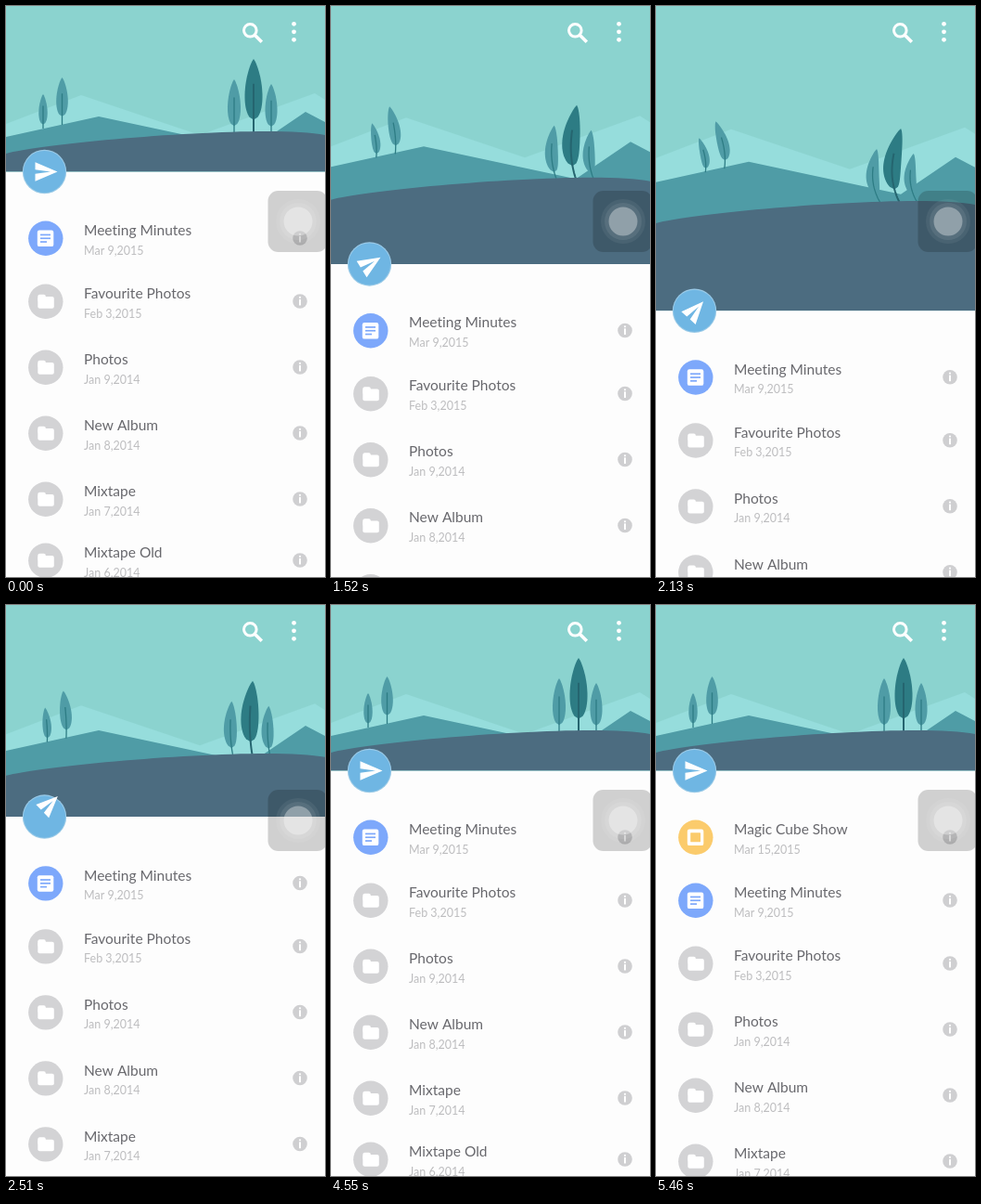
An HTML page with a canvas that plays this animation: 344x615 px, repeating every 5560 ms.

```html
<!DOCTYPE html>
<html lang="en">
<head>
<meta charset="utf-8">
<title>Pull to refresh</title>
<style>
html, body { margin: 0; width: 100%; height: 100%; overflow: hidden; background: #fdfdfd; }
canvas { display: block; width: 344px; height: 615px; }
</style>
</head>
<body>
<canvas id="stage"></canvas>
<script>
const W = 344, H = 615, LOOP = 5560, HEADER = 178.5;
const PULL = 760, RELEASE = 2470, FLY_BACK = 3132, LAND = 4070, INSERT = 4610, REVEAL = 4830;
const canvas = document.getElementById('stage');
const dpr = window.devicePixelRatio || 1;
canvas.width = W * dpr;
canvas.height = H * dpr;
const ctx = canvas.getContext('2d');

// title, date, icon kind, distance to the next row
const rows = [
  ['Meeting Minutes', 'Mar 9,2015', 'doc', 68],
  ['Favourite Photos', 'Feb 3,2015', 'folder', 71],
  ['Photos', 'Jan 9,2014', 'folder', 71],
  ['New Album', 'Jan 8,2014', 'folder', 71],
  ['Mixtape', 'Jan 7,2014', 'folder', 66],
  ['Mixtape Old', 'Jan 6,2014', 'folder', 71]
];
const newRow = ['Magic Cube Show', 'Mar 15,2015', 'slide', 68];
const iconColors = { doc: '#7da8fb', folder: '#d3d3d5', slide: '#fbcb6c' };

const progress = (t, start, length) => Math.min(1, Math.max(0, (t - start) / length));
const easeInOut = x => (1 - Math.cos(Math.PI * x)) / 2;
const easeOut = x => 1 - (1 - x) * (1 - x);
const mix = (a, b, x) => a + (b - a) * x;

function shape(color, build) {
  ctx.beginPath();
  build();
  ctx.fillStyle = color;
  ctx.fill();
}
const polygon = (color, points) =>
  shape(color, () => { points.forEach(p => ctx.lineTo(...p)); ctx.closePath(); });
const disc = (x, y, r, color) => shape(color, () => ctx.arc(x, y, r, 0, 7));
const box = (x, y, w, h, r, color) => shape(color, () => ctx.roundRect(x, y, w, h, r));

function place(x, y, draw, sx = 1, sy = sx, angle = 0) {
  ctx.save();
  ctx.translate(x, y);
  ctx.rotate(angle);
  ctx.scale(sx, sy);
  draw();
  ctx.restore();
}

function pullDistance(t) {
  if (t < PULL) return 0;
  const dragged = at => 250 * (1 - Math.exp((PULL - at) / 1500));
  if (t < RELEASE) return dragged(t);
  const x = progress(t, RELEASE, 500);
  return x < 1 ? dragged(RELEASE) * 2 ** (-10 * x) * Math.cos(4 * Math.PI * x) : 0;
}

// A leaf-shaped crown on a trunk; bow and lean are fractions of the height.
function tree(x, y, height, halfWidth, crownStart, bow, lean, crown, trunk) {
  const point = (u, side) => [
    x + height * (bow * Math.sin(Math.PI * u ** 0.85) + lean * u) + side,
    y - height * u
  ];
  const left = [], right = [], stem = [];
  for (let i = 0; i <= 24; i++) {
    const v = i / 24, u = mix(crownStart, 1, v);
    const w = halfWidth * Math.sqrt(v) * (1 - v) ** 0.8 / 0.42;
    left.push(point(u, -w));
    right.unshift(point(u, w));
    stem.push(point(v * 0.66, 0));
  }
  polygon(crown, left.concat(right));
  ctx.beginPath();
  stem.forEach(p => ctx.lineTo(...p));
  ctx.strokeStyle = trunk;
  ctx.lineWidth = height > 70 ? 2 : 1.3;
  ctx.stroke();
}

function scenery(d) {
  const k = d / 149, bottom = HEADER + d;
  ctx.save();
  ctx.beginPath();
  ctx.rect(0, 0, W, bottom);
  ctx.clip();
  ctx.fillStyle = '#8bd3cf';
  ctx.fillRect(0, 0, W, bottom);
  const ridge = (color, shift, points) =>
    polygon(color, [...points.map(([x, y]) => [x, y + shift]), [W, bottom], [0, bottom]]);
  ridge('#96dddc', d * 0.245, [[0, 127], [81, 96], [209, 139], [333, 94], [W, 101]]);
  ridge('#4f9ca6', d * 0.325, [[0, 141], [100, 119], [264, 154], [323, 114], [W, 125]]);
  const light = '#4f9ca6', deep = '#2d7c84', dark = '#25656f';
  [[40, 132, 37, 4.7, 0.12], [60.5, 128, 51, 6.3, 0.18]].forEach(([x, y, h, w, c]) =>
    tree(x + d * 0.088, y + d * 0.315, h, w, c, 0.07 * k, -0.18 * k, light, deep));
  [[246, 57, 7, 0.12, -0.06, light, deep], [286, 52, 6.5, 0.12, -0.07, light, deep],
   [267, 79, 9.5, 0.17, 0.02, deep, dark]].forEach(([x, h, w, c, lean, crown, trunk]) =>
    tree(x - d * 0.03, 136 + d * 0.5, h, w, c, -0.11 * k, lean * k, crown, trunk));
  shape('#4c6c80', () => {
    const y = d * 0.5;
    ctx.moveTo(0, 159 + y);
    ctx.bezierCurveTo(43, 147 + y, 281, 126.5 + y, W, 139 + y);
    ctx.lineTo(W, bottom);
    ctx.lineTo(0, bottom);
  });
  ctx.restore();
}

function icon(kind) {
  const color = iconColors[kind];
  disc(0, 0, 18.7, color);
  if (kind === 'folder') {
    box(-8.5, -7.5, 8.5, 8, 2, '#fff');
    box(-8.5, -5.2, 17.5, 12.7, 2, '#fff');
    return;
  }
  box(-9, -8.7, 17.5, 17.5, 2.2, '#fff');
  if (kind === 'slide') box(-5.6, -5, 10.8, 10, 0.5, color);
  else [11, 11, 7].forEach((w, i) => box(-5.8, -4.7 + i * 3.8, w, 1.7, 0, color));
}

function row([title, date, kind], y, shown = 1) {
  if (shown <= 0) return;
  place(42.8, y + 0.3, () => icon(kind), shown);
  place(84, y, () => {
    ctx.fillStyle = '#68686d';
    ctx.font = '15.5px Lato, sans-serif';
    ctx.fillText(title, 0, -3);
    ctx.fillStyle = '#bdbdbf';
    ctx.font = '12.5px Lato, sans-serif';
    ctx.fillText(date, 0, 17.6);
  }, shown, 1);
  disc(317, y, 7.8, '#cfcfd1');
  box(316, y - 2.2, 2, 6.8, 0.5, '#fff');
  disc(317, y - 4.2, 1.1, '#fff');
}

function list(t, d) {
  const insert = easeInOut(progress(t, INSERT, 250));
  let y = 250 + d;
  row(newRow, y, easeOut(progress(t, REVEAL, 300)));
  y += newRow[3] * insert;
  for (const item of rows) {
    row(item, y);
    y += item[3];
  }
}

function plane(t, d) {
  let x = 42, y = HEADER + d, sx = 1, sy = 1, angle = -d * 0.0056;
  if (t >= LAND) {
    const p = easeInOut(progress(t, LAND, 300));
    x += mix(-66, 0, p);
    y += mix(-14, 0, p);
    sx = sy = mix(0.9, 1, p);
  } else if (t >= FLY_BACK) {
    const p = progress(t, FLY_BACK, 600);
    x += mix(344, -66, easeInOut(p));
    y += mix(-178, -14, easeOut(p));
    sy = 0.9;
    sx = -0.95;
    angle = mix(-0.28, 0, p);
  } else if (t >= RELEASE) {
    const p = progress(t, RELEASE, 560);
    x += 344 * easeInOut(p);
    y -= 178 * p;
    sx = sy = mix(1, 0.5, p);
    angle = mix(-0.9, 0, easeOut(p));
  }
  place(x, y, () => polygon('#fff',
    [[13.5, 0], [-10.5, -10.3], [-10.5, -2.3], [6, 0], [-10.5, 2.3], [-10.5, 10.3]]), sx, sy, angle);
}

function toolbar() {
  ctx.strokeStyle = '#fff';
  ctx.lineWidth = 3;
  ctx.beginPath();
  ctx.arc(263.3, 26.3, 6.8, 0, 7);
  ctx.stroke();
  ctx.lineWidth = 3.6;
  ctx.beginPath();
  ctx.moveTo(268, 31);
  ctx.lineTo(275.8, 38.8);
  ctx.stroke();
  [19.3, 27.8, 36.3].forEach(y => disc(310.5, y, 2.4, '#fff'));
}

function touchButton() {
  box(282.5, 199, 64, 66, 11, 'rgba(0,0,0,.18)');
  [[24, 0.06], [20, 0.08], [15.5, 0.34]].forEach(([r, a]) =>
    disc(315, 232, r, `rgba(255,255,255,${a})`));
}

function draw(now) {
  const t = now % LOOP, d = pullDistance(t);
  ctx.setTransform(dpr, 0, 0, dpr, 0, 0);
  ctx.letterSpacing = '0.01px'; // turns ligatures off
  ctx.fillStyle = '#fdfdfd';
  ctx.fillRect(0, 0, W, H);
  scenery(d);
  list(t, d);
  disc(41.5, HEADER + d, 23.7, '#9acae7');
  disc(41.5, HEADER + d, 22.6, '#6fb6e3');
  plane(t, d);
  toolbar();
  touchButton();
}

const start = performance.now();
(function frame() {
  draw(performance.now() - start);
  requestAnimationFrame(frame);
})();
</script>
</body>
</html>
```
